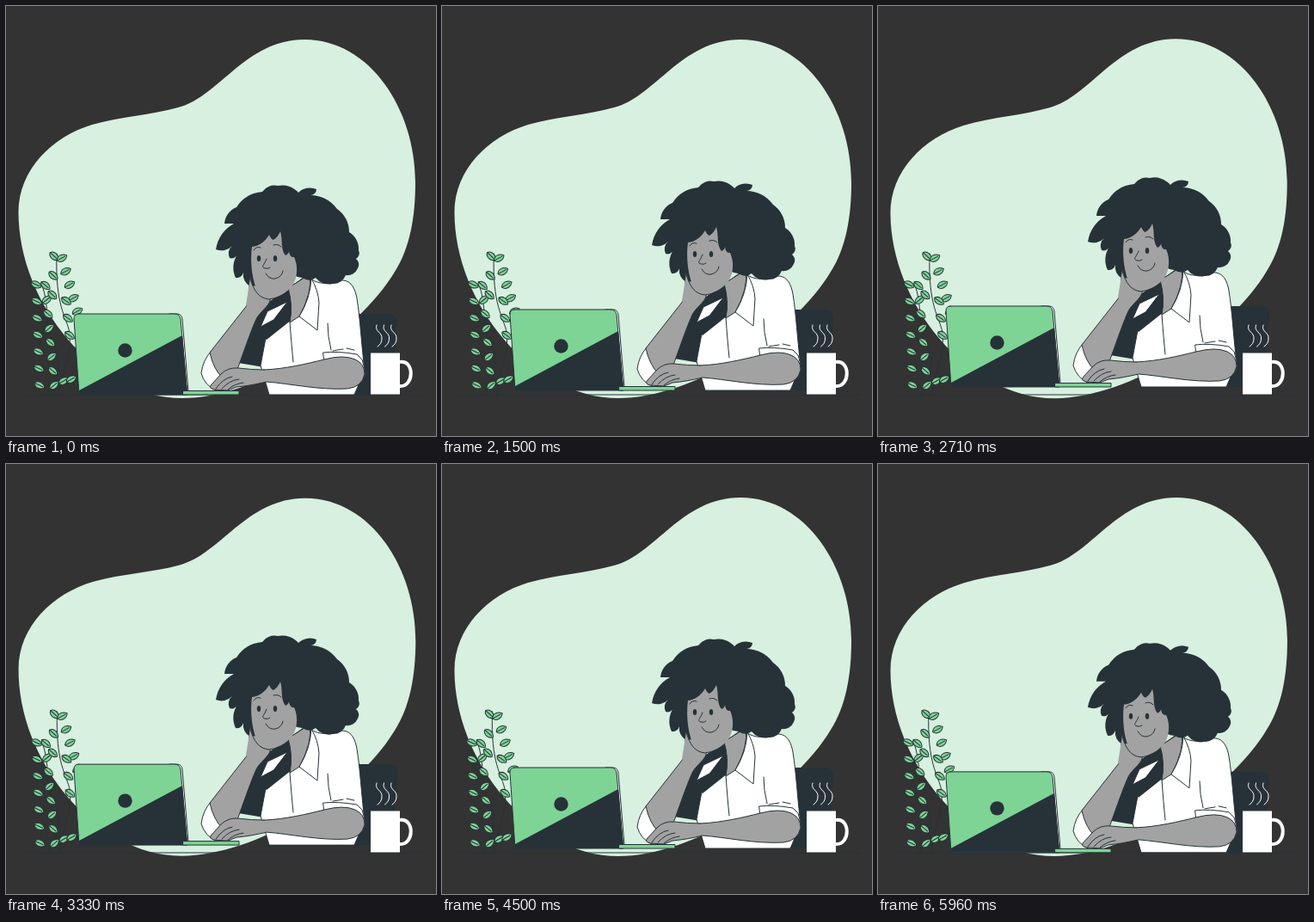
Recreate the animation shown at these times as an HTML page. Size 500 by 500 pixels, loop 6 s.

```html
<!DOCTYPE html>
<html lang="en">
<head>
<meta charset="utf-8">
<title>Working at a laptop</title>
<style>
  html, body { margin: 0; width: 100%; height: 100%; overflow: hidden; background: #333; }
  svg { display: block; width: 100%; height: 100%; }
  .dark { fill: #263238; }
  .skin { fill: #a2a2a2; }
  .white { fill: #fff; }
  .green { fill: #7dd495; }
  .ink { stroke: #263238; stroke-width: 1; stroke-linejoin: round; stroke-linecap: round; }
  .line { fill: none; }
</style>
</head>
<body>
<svg viewBox="0 0 500 500">
  <path id="blob" fill="#d7f0df" d="M347 39C423 39 476 120 476 205C476 245 470 281 452 309C408 383 290 456 205 456C104 456 14.500 345 14.500 240C14.500 190 54 152 100 138C135 128 168 127 200 118C248 106 278 39 347 39Z"/>
  <path class="ink line" d="M17 452H486"/>

  <g id="plant">
    <path class="ink line" d="M62 452C66 420 76 405 74 380C70 360 57 350 59 288M48 452C62 430 66 408 54 392C44 372 52 350 41 322"/>
  </g>

  <g id="float">
    <!-- chair -->
    <path class="dark" d="M400 358H445Q455 358 455 368L449 452H400Z"/>

    <!-- shirt -->
    <path class="dark" d="M345 316L300 348L285 367L264 414L300 420L334 372Z"/>
    <path class="white ink" d="M355 318C370 327 380 319 392 319C402 320 406 329 408 340C412 365 413 390 417 424L405 452H306L296 418L302 386L330 360Z"/>
    <path class="dark" d="M345 316L325 344L299 385L303 388L332 365L353 318Z"/>
    <path class="skin ink" d="M328 328L353 312Q357 332 341 361L330 368Q334 348 328 328Z"/>
    <path class="white ink" d="M327 344L304 355L296 373L311 365Z"/>
    <path class="white ink" d="M355 317Q363 330 364 345L362 377L341 361Q354 340 355 317Z"/>
    <path class="ink line" d="M330 367Q332 395 334 414M374 369Q374 384 378 400"/>

    <!-- propping arm -->
    <path class="white ink" d="M238 402Q229 412 227 427Q231 441 244 447L258 432Z"/>
    <path class="skin ink" d="M283 318C282 333 286 340 281 347L237 403Q241 422 252 433L268 425C276 404 283 382 291 364C296 354 310 347 307 338Z"/>

    <!-- head -->
    <path id="hair" class="dark"/>
    <path class="skin" d="M286 280C295 279 302 273 306 266Q308 271 311 272Q316 269 319 262C322 272 319 283 325 290Q329 288 329 285Q330 293 335 292C341 305 338 322 329 330C319 338 307 343 298 340C288 330 283 303 286 280Z"/>
    <path class="skin" d="M279 348L284 316Q288 334 302 342L290 356Z"/>
    <path class="ink line" d="M284 317C288 331 294 340 306 341Q321 339 329 330"/>
    <ellipse class="dark" cx="294" cy="293.500" rx="2.200" ry="3.500"/>
    <ellipse class="dark" cx="313" cy="293.500" rx="2.200" ry="3.500"/>
    <path class="ink line" d="M288 284Q291 279 296 281M311 278Q316 276 320 280M303 294C300 302 296 303 301 305Q305 306 307 304M302 311Q306 318 313 317Q321 315 322 308"/>

    <!-- typing arm -->
    <path class="white ink" d="M369 403Q385 401 408 405L414 411Q418 421 417 431L370 412Z"/>
    <path class="skin ink" d="M300 423C325 422 350 416 370 411Q393 405 406 411Q417 416 417 428Q414 443 397 445C365 447 330 439 303 437C290 440 280 442 268 443L258 447L242 446Q235 444 239 440L250 428Q258 420 270 421Q286 423 300 423Z"/>
    <path class="ink line" d="M244 445Q252 433 263 431M251 445Q260 435 271 434M258 446Q266 439 276 438M380 401L392 399M396 398L405 400"/>

    <!-- laptop -->
    <path class="white ink" d="M190 358H199Q204 358 205 364L212 448L209 452Z"/>
    <path class="green ink" d="M84 358H196Q202 358 203 364L211 452H85L79 364Q79 358 84 358Z"/>
    <path class="dark" d="M85 447L205 383L211 452H85Z"/>
    <circle class="dark" cx="138.500" cy="400.500" r="8.200"/>
    <path class="green ink" d="M206 447.500H271V452H206Z"/>
  </g>

  <!-- mug and steam -->
  <path class="white" d="M424 403.500H458V451.500H424Z"/>
  <path class="line" stroke="#fff" stroke-width="4" d="M458 414C475 411 475 443 458 442"/>
  <path id="steam" class="line" stroke="#fff" stroke-linecap="round"/>
</svg>
<script>
  const el = id => document.getElementById(id);
  const turn = 2 * Math.PI;

  // Outward arcs between the tips and notches of the hair, clockwise; longer arcs are flatter
  const scallop = points => points.map(([x, y], i) => {
    if (!i) return `M${x} ${y}`;
    const len = Math.hypot(x - points[i - 1][0], y - points[i - 1][1]);
    const r = len * (0.55 + len / 60);
    return `A${r} ${r} 0 0 1 ${x} ${y}`;
  }).join('') + 'Z';

  el('hair').setAttribute('d', scallop([
    [254, 253], [268, 234], [298, 216], [316, 209], [340, 217], [361, 213], [354, 220],
    [385, 236], [399, 263], [410, 284], [407, 294], [409, 305], [395, 313], [380, 323],
    [360, 316], [345, 316], [328, 305], [284, 326], [276, 310], [267, 316], [269, 289],
    [260, 293], [263, 279], [244, 283], [265, 253]
  ]));

  el('steam').setAttribute('d',
    [0, 8.5, 17].map(dx => `M${431 + dx} 371c-3 8 7 8 6 16c0 4-2 7-5 9`).join(''));

  // Leaves spread evenly along a line, their tilt alternating by the sign of flip
  function leaves(x0, y0, x1, y1, count, tilt, flip = 1) {
    for (let i = 0; i < count; i++) {
      const k = i / (count - 1);
      const x = x0 + (x1 - x0) * k, y = y0 + (y1 - y0) * k;
      el('plant').innerHTML +=
        `<g class="ink" transform="translate(${x} ${y}) rotate(${tilt * flip ** i})">
          <path class="green" d="M-6.500 0C-4 -5 3 -5 6.500 0C3 5 -4 5 -6.500 0Z"/>
          <path class="line" d="M-6 0H4"/></g>`;
    }
  }
  leaves(35, 324, 39, 441, 7, 25);
  leaves(46, 325, 56, 441, 8, 40, -1);
  leaves(56, 291, 54, 336, 3, 42);
  leaves(65, 293, 83, 355, 5, -28);
  leaves(70, 343, 74, 383, 3, 35);
  leaves(67, 436, 76, 434, 2, -30);

  const swing = p => Math.asin(Math.sin(turn * p)) * 4 / turn;

  function draw(now) {
    const t = now % 6000;
    const lift = 10 * (1 - Math.abs(1 - t / 3000));
    const sway = Math.cos(turn * (t - 1900) / 6000) + 0.4;
    el('float').setAttribute('transform', `translate(0 ${-lift})`);
    el('blob').setAttribute('transform', `rotate(${swing(t / 3000)} 245 248)`);
    el('plant').setAttribute('transform', `translate(${sway} 0)`);
  }

  const start = performance.now();
  function tick() {
    draw(performance.now() - start);
    requestAnimationFrame(tick);
  }
  tick();
</script>
</body>
</html>
```
